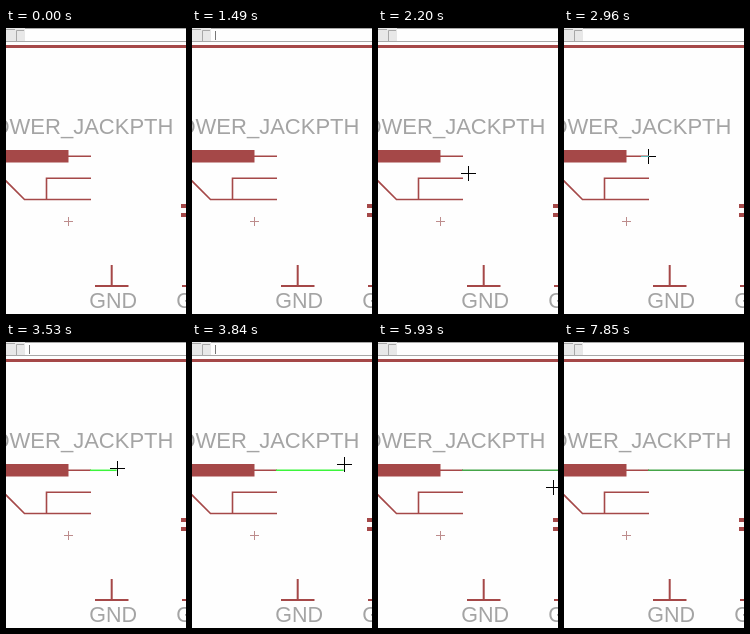
An HTML page for the animation above (8 s loop, 180x286 px).

```html
<!DOCTYPE html>
<html lang="en">
<head>
<meta charset="utf-8">
<title>Drawing a net in a schematic</title>
<style>
html, body { margin: 0; width: 100%; height: 100%; overflow: hidden; background: #fefefe; }
svg { display: block; width: 180px; height: 286px; }
text { font: 22px "Liberation Sans", Arial, sans-serif; fill: #a4a4a4; }
.wire { fill: none; stroke: #a54848; stroke-width: 1.6; }
.bold { stroke-width: 2; }
#cursor { mix-blend-mode: difference; }
</style>
</head>
<body>
<svg viewBox="0 0 180 286">
  <defs>
    <g id="ground">
      <path class="wire bold" d="M105.7 237V258M89 258H122.5"/>
      <text x="83.3" y="280" style="font-size:21.5px">GND</text>
    </g>
  </defs>
  <rect width="180" height="286" fill="#fefefe"/>

  <!-- command bar -->
  <rect width="180" height="14" fill="#e8e8e8"/>
  <rect x="19" y="1" width="161" height="12" fill="#fefefe"/>
  <path fill="none" stroke="#a8a8a8" d="M0 1.5H9M10.5 13V2.5H18M19 .5H180M0 13.5H180"/>
  <path id="caret" stroke="#777" d="M23.5 3V12"/>

  <!-- schematic -->
  <rect y="17" width="180" height="3" fill="#a54848"/>
  <text x="167.4" y="106" text-anchor="end">OWER_JACKPTH</text>
  <rect y="122" width="62.5" height="12.5" fill="#a54848"/>
  <path class="wire" d="M62 128.3H85M85 150.2H40.5V171.5M85 171.5H18.5L-2 151"/>
  <path stroke="#bd8c8c" d="M58 193.5H67M62.5 189V198"/>
  <path stroke="#a54848" stroke-width="4" d="M175 178H180M175 187H180"/>
  <use href="#ground"/>
  <use href="#ground" x="87"/>

  <path id="net" fill="none" stroke-width="1.5"/>
  <path id="cursor" stroke="#fff" d="M-7 .5H8M.5 -7V8"/>
</svg>
<script>
const LOOP = 8000, BLINK = 490.5;
const PIN = { x: 84, y: 128 };
const DRAG = 3330, DRAG_END = 4130, DESELECT = 5080;

const [caret, net, cursor] = ["caret", "net", "cursor"].map(id => document.getElementById(id));
const show = (el, on) => el.setAttribute("visibility", on ? "visible" : "hidden");
const progress = (t, from, to) => Math.min(1, Math.max(0, (t - from) / (to - from)));
const lerp = (a, b, p) => a + (b - a) * p;
const curve = (a, b, c, p) => lerp(lerp(a, b, p), lerp(b, c, p), p);

// Pointer position, or null while it is off stage
function pointerAt(t) {
  if (t >= 1490 && t < 2370) {          // sweep in from the left
    const p = progress(t, 1490, 2280);
    return { x: curve(-8, 86, 92, p), y: curve(216, 223, 127, p) };
  }
  if (t >= 2370 && t < DRAG) {          // settle on the pin
    return { x: lerp(92, PIN.x, progress(t, 2370, 2450)), y: t < 2600 ? 127 : PIN.y };
  }
  if (t >= DRAG && t < DRAG_END) {      // pull the net to the right
    const p = progress(t, DRAG, DRAG_END);
    return { x: lerp(PIN.x, 190, p), y: lerp(PIN.y, 119, p) };
  }
  if (t >= 5680 && t < 6030) {          // dip back in at the right edge
    const p = progress(t, 5680, 6030);
    return { x: curve(188, 156, 188, p), y: curve(126, 151, 143, p) };
  }
  return null;
}

function draw(now) {
  const t = now % LOOP;
  show(caret, Math.floor(t / BLINK) % 2);

  const pos = pointerAt(t);
  show(cursor, pos);
  if (pos) cursor.setAttribute("transform", `translate(${Math.round(pos.x)} ${Math.round(pos.y)})`);

  show(net, t > DRAG);
  const end = t < DRAG_END && pos ? pos.x : 180;
  net.setAttribute("d", `M${PIN.x} 128.3H${end}`);
  net.setAttribute("stroke", t < DESELECT ? "#3cf53c" : "#45a548");

  requestAnimationFrame(draw);
}
draw(performance.now());
</script>
</body>
</html>
```
